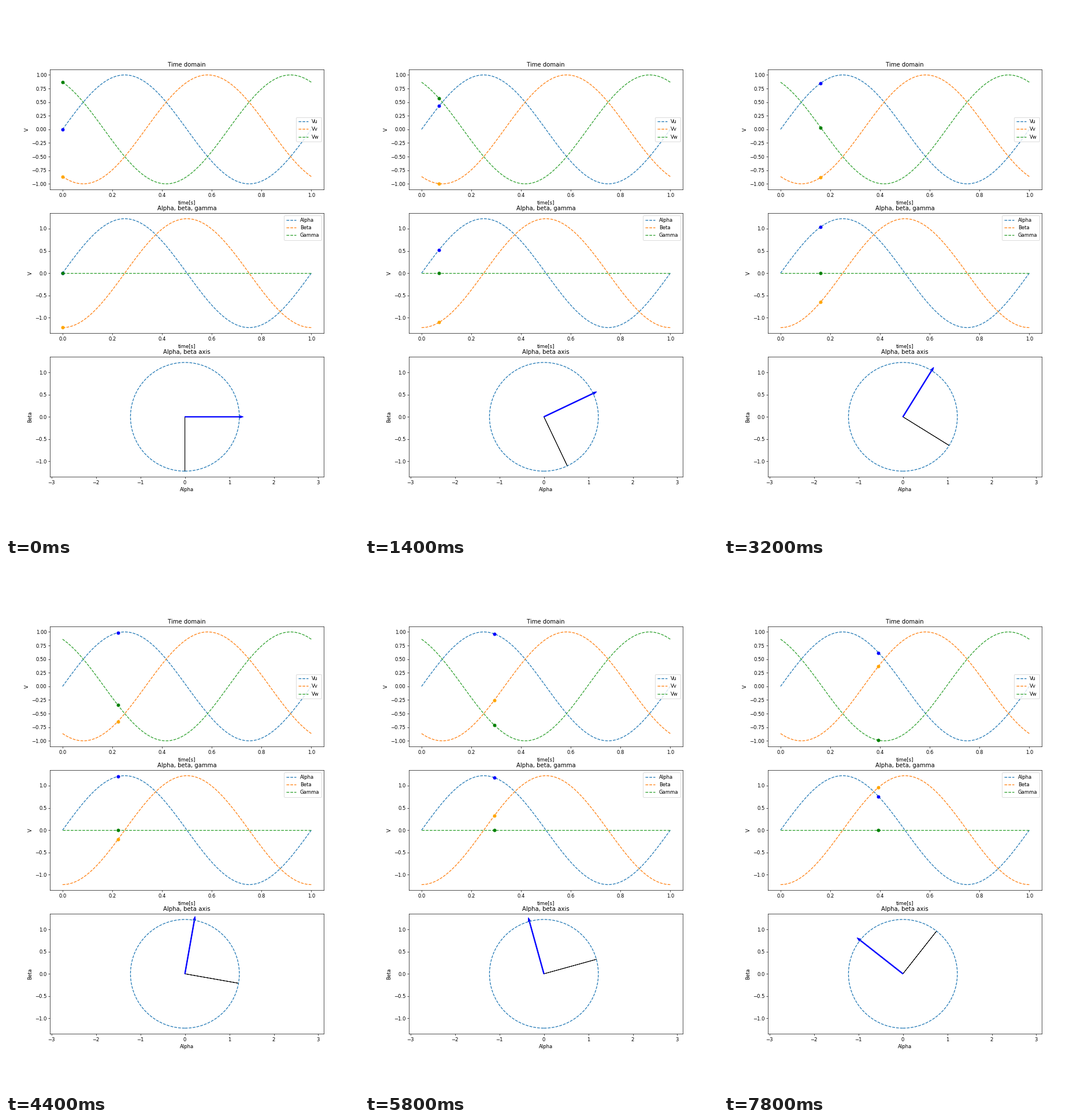
Recreate the animation shown at these times as a matplotlib script. Size 611 by 917 pixels, loop 8000 ms.

```python
import numpy as np
import matplotlib.pyplot as plt
from matplotlib.animation import FuncAnimation

W, H, DPI = 611, 917, 61.1
FRAMES, INTERVAL = 40, 200
DOT_COLORS = ("blue", "orange", "green")

# three-phase voltages and their Clarke transform
t = np.linspace(0, 1, 100)
phases = [np.sin(2 * np.pi * t + k * 2 * np.pi / 3) for k in (0, -1, 1)]
vu, vv, vw = phases
scale = np.sqrt(2 / 3)
alpha = scale * (vu - vv / 2 - vw / 2)
beta = scale * np.sqrt(3) / 2 * (vv - vw)
gamma = scale / np.sqrt(2) * (vu + vv + vw)

# the small margin keeps the pixel size from rounding down
fig, (ax_time, ax_abg, ax_plane) = plt.subplots(
    3, 1, figsize=((W + 1e-4) / DPI, (H + 1e-4) / DPI), dpi=DPI)


def wave_panel(ax, title, curves, labels, loc):
    for y, label in zip(curves, labels):
        ax.plot(t, y, "--", label=label)
    ax.set(title=title, xlabel="time[s]", ylabel="V")
    ax.legend(loc=loc)
    return [(ax.plot(t[:1], y[:1], "o", color=c)[0], y)
            for y, c in zip(curves, DOT_COLORS)]


dots = wave_panel(ax_time, "Time domain", phases,
                  ("Vu", "Vv", "Vw"), "center right")
dots += wave_panel(ax_abg, "Alpha, beta, gamma", (alpha, beta, gamma),
                   ("Alpha", "Beta", "Gamma"), "upper right")

ax_plane.plot(alpha, beta, "--")
ax_plane.set(title="Alpha, beta axis", xlabel="Alpha", ylabel="Beta")
vector = ax_plane.arrow(0, 0, alpha[0], beta[0], color="black")
normal = ax_plane.arrow(0, 0, -beta[0], alpha[0], width=0.02, color="blue")

# equal units on both axes, with room for the arrow heads
radius = np.sqrt(1.5)
low, high = -radius - 0.0045, radius
pad = 0.05 * (high - low)
box = ax_plane.get_position()
half = (high - low + 2 * pad) / 2 * (box.width * W) / (box.height * H)
ax_plane.set_ylim(low - pad, high + pad)
ax_plane.set_xlim(0.045 - half, 0.045 + half)


def update(i):
    for dot, y in dots:
        dot.set_data([t[i]], [y[i]])
    vector.set_data(dx=alpha[i], dy=beta[i])
    normal.set_data(dx=-beta[i], dy=alpha[i])
    return [dot for dot, _ in dots] + [vector, normal]


anim = FuncAnimation(fig, update, frames=FRAMES, interval=INTERVAL,
                     init_func=lambda: update(0), repeat=True,
                     repeat_delay=0, blit=False)
plt.show()
```
